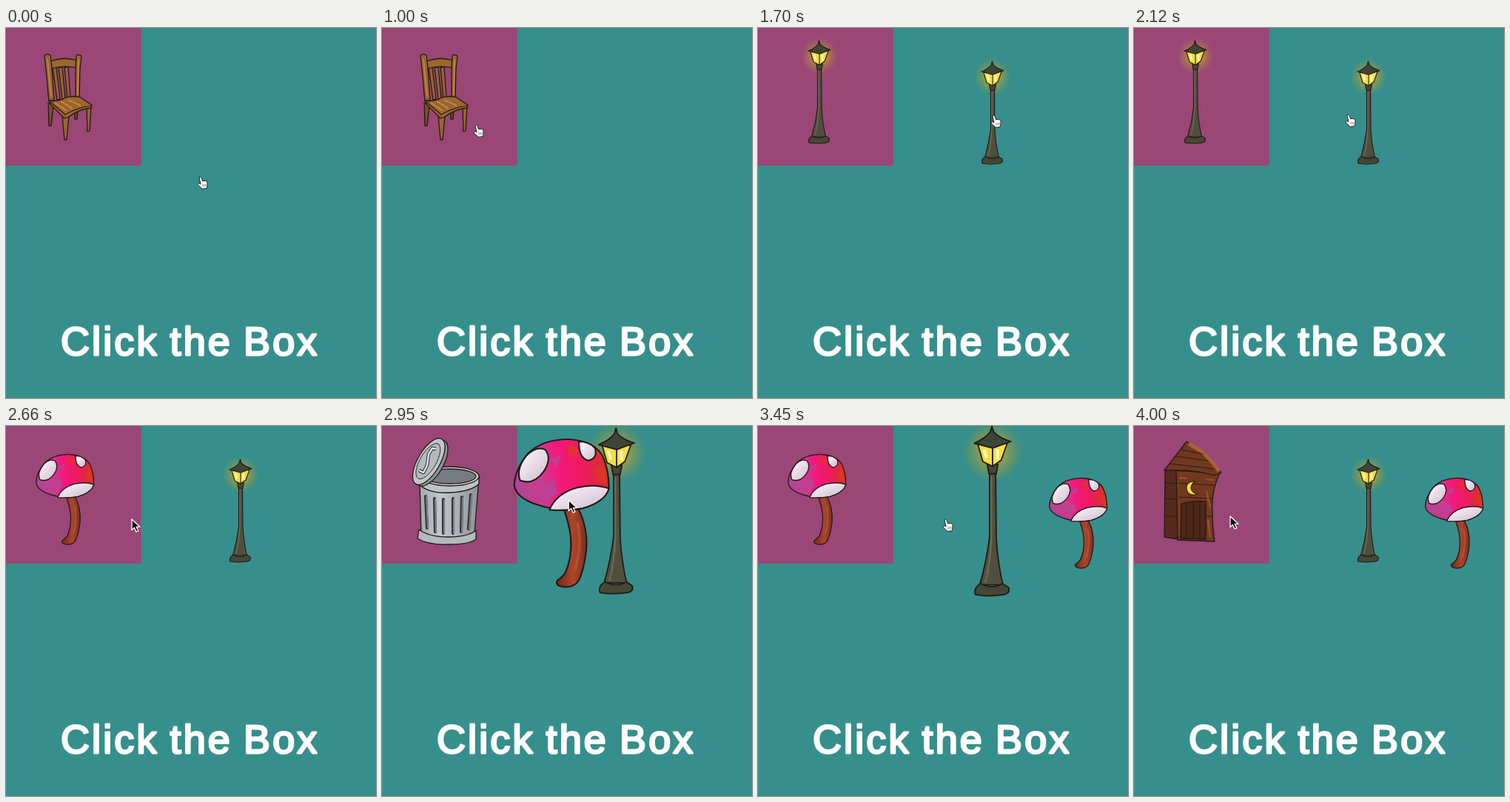
An HTML page that plays this animation: 500 by 500 pixels, repeating every 4.1 s.

```html
<!DOCTYPE html>
<html lang="en">
<head>
<meta charset="utf-8">
<title>Click the Box</title>
<style>
html, body { margin: 0; width: 100%; height: 100%; overflow: hidden; background: #368f8c; }
svg { display: block; width: 100vw; height: 100vh; }
.ink { stroke: #231a18; stroke-width: 1.3; stroke-linejoin: round; stroke-linecap: round; }
.line { fill: none; stroke: #2c1a12; stroke-linecap: round; stroke-linejoin: round; }
text {
  font: 54px "Liberation Sans", Arial, sans-serif; letter-spacing: 3.1px; word-spacing: -3px;
  fill: #fff; stroke: #fff; stroke-width: 2.8; stroke-linejoin: round;
}
</style>
</head>
<body>
<svg viewBox="0 0 500 500">
<defs>
  <radialGradient id="glow">
    <stop offset="0" stop-color="#d8c030" stop-opacity=".8"/>
    <stop offset=".5" stop-color="#c4a52c" stop-opacity=".5"/>
    <stop offset="1" stop-color="#a89828" stop-opacity="0"/>
  </radialGradient>
  <linearGradient id="cap" x1="0" y1=".4" x2="1" y2=".3">
    <stop offset="0" stop-color="#b04593"/>
    <stop offset=".28" stop-color="#c93c8e"/>
    <stop offset=".45" stop-color="#f4187c"/>
    <stop offset=".72" stop-color="#ee1b5c"/>
    <stop offset="1" stop-color="#d23425"/>
  </linearGradient>
  <linearGradient id="stem">
    <stop offset="0" stop-color="#6e2a18"/>
    <stop offset=".55" stop-color="#ac452b"/>
    <stop offset="1" stop-color="#7c3020"/>
  </linearGradient>
  <linearGradient id="steel">
    <stop offset="0" stop-color="#a4a9ad"/>
    <stop offset=".35" stop-color="#c3c7ca"/>
    <stop offset="1" stop-color="#8d9297"/>
  </linearGradient>
  <linearGradient id="spot" x1="0" y1="0" x2="1" y2="1">
    <stop offset=".2" stop-color="#f6eef5"/>
    <stop offset="1" stop-color="#cdb9ce"/>
  </linearGradient>

  <g id="chair">
    <g class="ink" fill="#7c4b20">
      <path d="M93 113L97 113 96 123 93 123Z"/>
      <path d="M57 101L64 105 61 132 58 132Z"/>
    </g>
    <g class="ink" fill="#9a662e">
      <path d="M109 107L115 106 113 139 110 140Z"/>
      <path d="M76 118L85 119 82 151 79 151Z"/>
      <path d="M63 53L68 53 73 96 69 97Z"/>
      <path d="M71 53L76 53 80 95 76 96Z"/>
      <path d="M79 53L84 53 87 94 83 95Z"/>
      <path d="M60 45Q79 38 96 44L96 54Q78 50 61 55Z"/>
      <path d="M52 37Q56 34 60 37L62 54 65 98 58 99 55 66Z"/>
      <path d="M95 37Q98 35 102 38L100 54 99 95 94 94 94 54Z"/>
      <path d="M59 98Q72 100 80 94Q92 91 101 94L116 104 115 108Q98 110 85 120L79 122 60 103Z"/>
    </g>
    <path class="line" stroke-width="1.1" d="M60 100L80 117Q98 107 115 105"/>
    <path d="M66 101L82 112M74 99L90 109M84 97L101 105M56 42L61 92M98 43L97 90" stroke="#c58b46" stroke-width="1.6" fill="none"/>
  </g>

  <g id="lamp">
    <circle cx="83" cy="38" r="25" fill="url(#glow)"/>
    <g class="ink" style="stroke-width:1.1">
      <path fill="#504f3f" d="M80.500 54H85.500L86 108Q87 128 91.500 147H72.500Q78 128 80.500 108Z"/>
      <path fill="#454737" d="M73 146Q83 151 91 146L96 149Q98 154 92 155Q80 157 69 155Q67 150 73 146Z"/>
      <path fill="#454737" d="M78.500 48L87.500 48 86 56 80 56Z"/>
      <path fill="#f0de4c" d="M71 32L95 31 90 45 83 50 75 46Z"/>
      <path fill="#3e4537" d="M68 31Q77 27 81 22L82.500 17 84 22Q89 27 98 29.500L83 35Z"/>
      <path fill="none" d="M83 35V50"/>
    </g>
    <path d="M76 36L78 43M87 36L87 44" stroke="#fff9ac" stroke-width="2.500"/>
    <path d="M82 58L82 108Q81 130 77 145" fill="none" stroke="#6f6c50" stroke-width="1.3"/>
  </g>

  <g id="mushroom" transform="translate(80 99) scale(.605) translate(-430 -138)">
    <g class="ink" style="stroke-width:2.1">
      <path fill="url(#stem)" d="M431 130L452 132Q466 160 463 190Q460 215 453 230Q447 240 433 239Q421 238 423 231Q429 227 434 221Q444 200 442 172Q439 148 431 130Z"/>
      <path fill="url(#cap)" d="M365 101Q366 78 384 57Q405 37 441 38Q474 41 485 60Q494 79 494 105Q487 125 454 133Q425 137 396 127Q368 118 365 101Z"/>
      <path fill="url(#spot)" d="M373 94Q367 78 382 60Q395 47 407 52Q417 64 405 82Q391 101 373 94Z"/>
      <path fill="url(#spot)" d="M453 41Q467 41 475 50Q479 64 466 67Q453 64 453 41Z"/>
      <path fill="url(#spot)" d="M413 134Q422 112 450 104Q474 98 494 105Q489 123 458 132Q434 136 413 134Z"/>
    </g>
    <path d="M404 103L420 91 424 110 410 121ZM413 65L430 58 424 76Z" fill="#a9509f" opacity=".6"/>
    <path d="M441 44L453 53 448 62 436 56ZM474 76L488 74 491 97 478 94Z" fill="#de3a20" opacity=".7"/>
    <path d="M451 152Q458 182 448 215" fill="none" stroke="#c85e40" stroke-width="4" opacity=".5"/>
  </g>

  <g id="trash">
    <g class="ink">
      <path fill="url(#steel)" d="M51 77L53 146Q66 153 90 152Q116 152 125 144L131 70Z"/>
      <path fill="#b4b9bc" d="M50 140L48 152Q62 161 90 160Q118 160 127 153V141Q116 150 90 150Q64 150 50 140Z"/>
      <path fill="#bfc3c6" d="M53 68L50 79Q64 92 93 90Q122 88 131 78V66Z"/>
      <ellipse fill="#cdd1d3" cx="92" cy="68" rx="39" ry="13"/>
      <ellipse fill="#757b80" cx="92" cy="68" rx="35" ry="10"/>
      <g transform="rotate(-60 65 49)">
        <ellipse fill="#8c9195" cx="65" cy="51" rx="35" ry="16"/>
        <ellipse fill="#c2c6c9" cx="65" cy="47" rx="35" ry="15"/>
        <ellipse fill="#b4b9bc" cx="65" cy="46" rx="27" ry="11" stroke-width=".8"/>
      </g>
    </g>
    <path d="M50 60L56 63 61 53 63 38 68 30 73 31" fill="none" stroke="#282a2c" stroke-width="4.500" stroke-linejoin="round"/>
    <path d="M50 60L56 63 61 53 63 38 68 30 73 31" fill="none" stroke="#dfe2e4" stroke-width="2.500" stroke-linejoin="round"/>
    <path d="M59 95L61 138M71 98L72 143M83 99V145M96 98V145M108 96L107 143M120 93L117 139" stroke="#34383b" stroke-width="4.200" stroke-linecap="round"/>
    <path d="M60 96L62 138M72 99L73 143M84 100V145M97 99V145M109 97L108 143M121 94L118 139" stroke="#7d8388" stroke-width="2" stroke-linecap="round"/>
  </g>

  <g id="outhouse">
    <g class="ink">
      <path fill="#552a1b" d="M42 58L61 60 61 153 41 150Z"/>
      <path fill="#74381f" d="M57 60L116 64Q104 88 106 116Q106 138 109 156L59 154Z"/>
      <path fill="#713820" d="M41 60L71 21 91 32Q108 46 118 63L108 67Q82 58 41 60Z"/>
      <path fill="#4b271a" d="M64 105Q80 100 97 102L97 153 63 152Z"/>
    </g>
    <path d="M74 24L91 34Q106 47 115 61" fill="none" stroke="#a9603f" stroke-width="5"/>
    <path class="line" stroke-width="1.1" d="M64 32L93 38M57 41L100 47M49 51L108 58M42 76L56 78M42 98L57 99M42 122L58 122M59 77L109 80M59 96L105 98M98 122L106 122M71 105V151M80 104V152M89 103V152"/>
    <path d="M98 72L108 73M98 88L103 110M100 126L103 150M61 70L71 71" stroke="#95502e" stroke-width="2.500"/>
    <path d="M83 75Q70 74 71 85Q73 96 87 92Q78 91 77 84Q77 78 83 75Z" fill="#f2d94b" stroke="#33200f" stroke-width="1.2"/>
  </g>

  <path id="arrow" d="M0 0V14.500L3.400 11.400 6 17 8.800 15.800 6.300 10.500 11 10.200Z" fill="#111" stroke="#fff" stroke-width="1.3" stroke-linejoin="round"/>
  <g id="hand">
    <path d="M-1 .8Q.3-1 1.800 .8L3.800 6Q5 4.500 6.200 5.800Q7.500 4.800 8.300 6.200Q9.800 5.700 10 7.500L10 11.500Q9.800 13.500 9 15.800L3 16.300 -2.500 11Q-3.600 9-1.800 8.600L1 10Z" fill="#fff" stroke="#202020" stroke-width="1" stroke-linejoin="round"/>
    <path d="M4 10V13.500M6 10V13.500M8 9.800V13" stroke="#555" stroke-width=".7"/>
  </g>
</defs>

<rect width="500" height="500" fill="#368f8c"/>
<rect width="182.500" height="186" fill="#9a4677"/>
<use id="inbox" href="#chair"/>
<text x="74" y="442">Click the Box</text>
<use id="post" href="#lamp"/>
<use id="shroom" href="#mushroom"/>
<use id="pointer" href="#hand"/>
</svg>

<script>
const LOOP = 4100;
const el = id => document.getElementById(id);
const [inbox, post, shroom, pointer] = ["inbox", "post", "shroom", "pointer"].map(el);

// Hard switches: [time, symbol]
const boxItems = [[0, "chair"], [1060, "lamp"], [2360, "mushroom"], [2760, "trash"], [3400, "mushroom"], [3770, "outhouse"]];
const pointers = [[0, "hand"], [2400, "arrow"], [3260, "hand"], [3720, "arrow"]];

// Eased tracks: [time, ...values]
const path = [
  [0, 262, 201], [40, 262, 201], [120, 254, 197], [450, 254, 197], [700, 127, 131], [1000, 127, 131],
  [1120, 84, 90], [1560, 318, 118], [1720, 318, 118], [1920, 330, 112], [2500, 182, 130], [2660, 170, 126],
  [2760, 89, 82], [3160, 439, 121], [3220, 439, 121], [3450, 253, 126], [3700, 138, 124], [4000, 130, 122]
];
const postSize = [[1740, 1], [1820, 1.65], [1980, 1.65], [2060, 1], [2900, 1], [2960, 1.65], [3060, 1.65], [3120, 1],
  [3300, 1], [3360, 1.65], [3500, 1.65], [3570, 1]];
const shroomSize = [[2760, 1], [2810, 1.64], [3270, 1.64], [3340, 1]];
const shroomRest = [[3220, 430, 138], [3340, 433, 131]];

const pick = (list, t) => list.reduce((now, [at, name]) => t >= at ? name : now, list[0][1]);

function at(track, t) {
  const i = track.findIndex(k => k[0] > t);
  if (i === 0) return track[0].slice(1);
  if (i < 0) return track[track.length - 1].slice(1);
  const [a, b] = [track[i - 1], track[i]];
  const p = (t - a[0]) / (b[0] - a[0]);
  const e = p * p * (3 - 2 * p);
  return a.slice(1).map((v, n) => v + (b[n + 1] - v) * e);
}

function place(node, x, y, size, cx, cy) {
  node.setAttribute("transform", `translate(${x} ${y}) scale(${size}) translate(${-cx} ${-cy})`);
}

function show(node, on) {
  node.setAttribute("visibility", on ? "visible" : "hidden");
}

function draw(now) {
  const t = now % LOOP;
  const [x, y] = at(path, t);
  inbox.setAttribute("href", "#" + pick(boxItems, t));
  pointer.setAttribute("href", "#" + pick(pointers, t));
  place(pointer, x, y, 1, 0, 0);

  show(post, t >= 1120);
  const [px, py] = t < 1560 ? [x - 1, y - 4] : [317, 114];
  place(post, px, py, at(postSize, t)[0], 83, 86);

  show(shroom, t >= 2760);
  const [sx, sy] = t < 3220 ? [x - 9, y + 17] : at(shroomRest, t);
  place(shroom, sx, sy, at(shroomSize, t)[0], 80, 99);
}

const start = performance.now();
function tick() {
  draw(performance.now() - start);
  requestAnimationFrame(tick);
}
tick();
</script>
</body>
</html>
```
